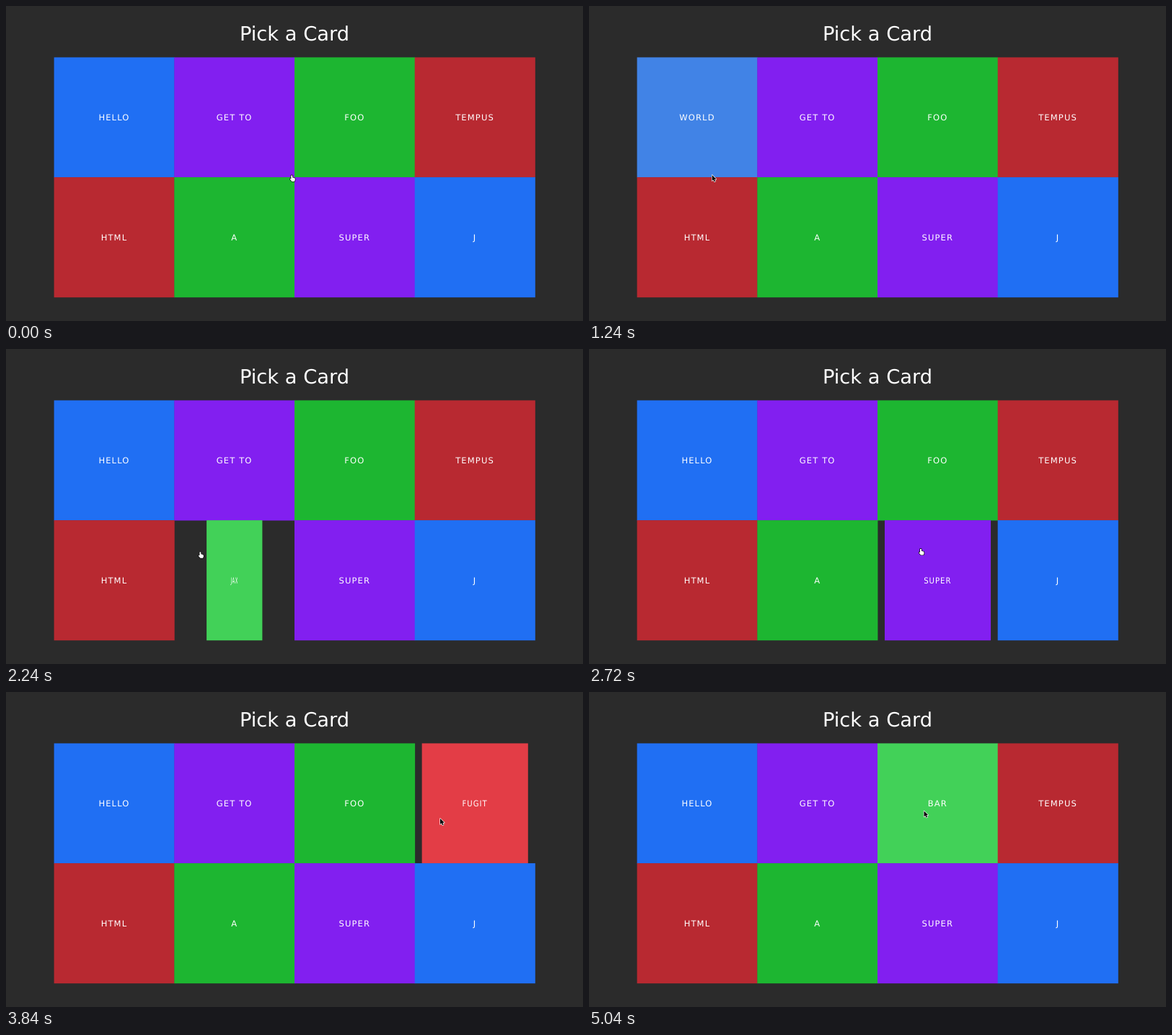
An HTML page with a canvas for the animation above (5.08 s loop, 800x438 px).

```html
<!DOCTYPE html>
<html lang="en">
<head>
<meta charset="utf-8">
<title>Pick a Card</title>
<style>
  html, body { margin: 0; width: 100%; height: 100%; overflow: hidden; background: #2b2b2b; }
  canvas { display: block; }
</style>
</head>
<body>
<canvas id="stage" width="800" height="438"></canvas>
<script>
const ctx = document.getElementById('stage').getContext('2d');
const LOOP = 5080, STEP = 40, FLIP = 500, ARROW_DELAY = 224;
const LEFT = 66.6, TOP = 71.4, SIZE = 166.7, OVERLAP = 0.4;
const FONT = '"DejaVu Sans", Verdana, sans-serif';

const COLORS = {
  blue: { front: '#206ff3', back: '#4183e6' },
  purple: { front: '#821ff0', back: '#a04bf5' },
  green: { front: '#1db631', back: '#42d158' },
  red: { front: '#b82931', back: '#e33d46' },
};

// enter: when the pointer arrives; a card resets at once when the next is entered
const CARDS = [
  { color: 'blue', front: 'HELLO', back: 'WORLD', enter: 714 },
  { color: 'purple', front: 'GET TO', back: 'KNOW', enter: 60 },
  { color: 'green', front: 'FOO', back: 'BAR', enter: 4110 },
  { color: 'red', front: 'TEMPUS', back: 'FUGIT', enter: 3568 },
  { color: 'red', front: 'HTML', back: 'ROCKS', enter: 1495 },
  { color: 'green', front: 'A', back: 'JAX', enter: 2050 },
  { color: 'purple', front: 'SUPER', back: 'NOVA', enter: 2652 },
  { color: 'blue', front: 'J', back: 'QUERY', enter: 3218 },
];

// key points of the pointer's route
const ROUTE = [
  { t: 0, x: 396.3, y: 235.5 },
  { t: 560, x: 300, y: 190 },
  { t: 720, x: 210, y: 188 },
  { t: 1720, x: 177.5, y: 273.5 },
  { t: 2500, x: 340, y: 282 },
  { t: 2720, x: 460, y: 278 },
  { t: 3440, x: 599.5, y: 283 },
  { t: 3840, x: 602, y: 176 },
  { t: 4700, x: 464.5, y: 165.5 },
];

const HAND = new Path2D('M-1 0H.8L1 3L4 3.6L4.6 6L3.6 8.4H0L-2.6 5.3L-2 4.2L-1 5Z');
const ARROW = new Path2D('M0 0V8L1.9 6.3L3.2 9.2L4.6 8.6L3.3 5.8H5.8Z');

// cubic-bezier(.25, .1, .25, 1), solved by bisection
function ease(x) {
  if (x >= 1) return 1;
  let lo = 0, hi = 1;
  for (let i = 0; i < 24; i++) {
    const s = (lo + hi) / 2;
    if (0.75 * s * (1 - s) + s ** 3 < x) lo = s; else hi = s;
  }
  return 0.3 * lo * (1 - lo) ** 2 + 3 * lo * lo * (1 - lo) + lo ** 3;
}

// smooth curve through the route, at rest at both ends
function pointer(t, axis) {
  const i = ROUTE.findIndex(p => p.t > t) - 1;
  if (i < 0) return ROUTE[ROUTE.length - 1][axis];
  const slope = k => {
    const before = ROUTE[k - 1], after = ROUTE[k + 1];
    return before && after ? (after[axis] - before[axis]) / (after.t - before.t) : 0;
  };
  const a = ROUTE[i], b = ROUTE[i + 1], span = b.t - a.t;
  const u = (t - a.t) / span, v = 1 - u;
  return a[axis] * (1 + 2 * u) * v * v + b[axis] * u * u * (1 + 2 * v) +
    span * u * v * (slope(i) * v - slope(i + 1) * u);
}

function label(text, x, y, size, spacing) {
  ctx.font = `${size}px ${FONT}`;
  ctx.letterSpacing = spacing + 'px';
  ctx.fillStyle = '#fff';
  ctx.fillText(text, x, y);
}

function drawCard(card, index, turn) {
  const cos = Math.cos(turn * Math.PI);
  const side = cos < 0 ? 'back' : 'front';
  const column = index % 4, row = Math.floor(index / 4);
  ctx.save();
  ctx.translate(LEFT + SIZE * (column + 0.5), TOP + SIZE * (row + 0.5));
  ctx.scale(Math.abs(cos), 1);
  ctx.fillStyle = COLORS[card.color][side];
  ctx.fillRect(-SIZE / 2, -SIZE / 2, SIZE + OVERLAP, SIZE + OVERLAP);
  label(card[side], 0, 4.7, 11.5, 1.15);
  ctx.restore();
}

function drawPointer(shape, x, y, fill, outline) {
  ctx.save();
  ctx.translate(x, y);
  ctx.strokeStyle = outline;
  ctx.stroke(shape);
  ctx.fillStyle = fill;
  ctx.fill(shape);
  ctx.restore();
}

function draw(t) {
  ctx.fillStyle = '#2b2b2b';
  ctx.fillRect(0, 0, 800, 438);
  label('Pick a Card', 400, 48, 27.3, 0);

  const lastEnter = Math.max(...CARDS.map(c => c.enter).filter(e => e <= t));
  const age = t - lastEnter;
  CARDS.forEach((card, i) => drawCard(card, i, card.enter === lastEnter ? ease(age / FLIP) : 0));

  const x = pointer(t, 'x'), y = pointer(t, 'y');
  if (lastEnter > 0 && age > ARROW_DELAY) drawPointer(ARROW, x, y, '#000', '#fff');
  else drawPointer(HAND, x, y, '#fff', '#000');
}

ctx.textAlign = 'center';
ctx.textRendering = 'geometricPrecision';
ctx.lineJoin = 'round';
ctx.lineWidth = 1.3;

const start = performance.now();
function tick() {
  const t = (performance.now() - start) % LOOP;
  draw(Math.floor(t / STEP) * STEP);
  requestAnimationFrame(tick);
}
tick();
</script>
</body>
</html>
```
